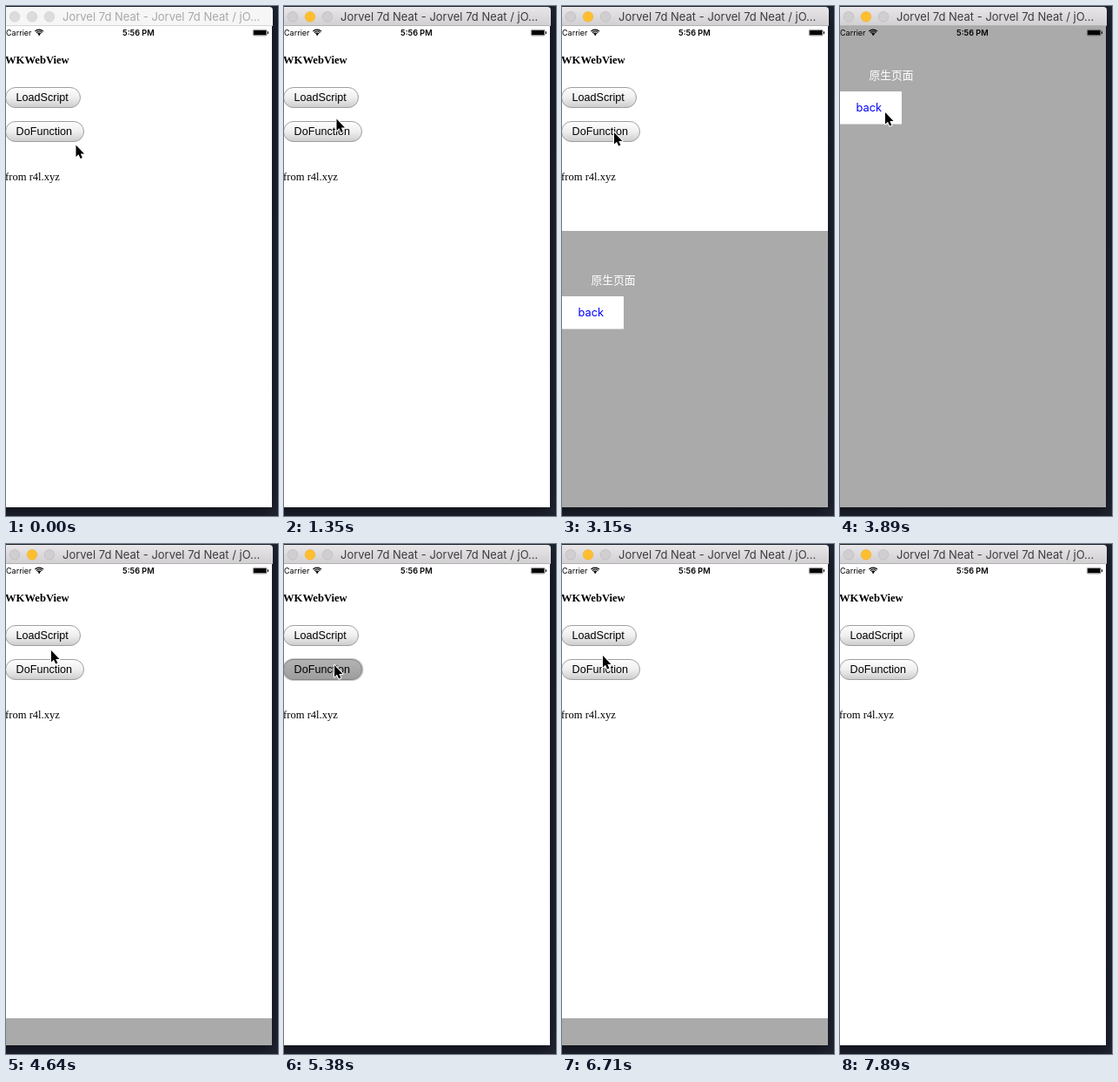
These frames come from a looping animation (313x585 px, 8.64 s). An HTML page with a canvas:

```html
<!DOCTYPE html>
<html lang="en">
<head>
<meta charset="utf-8">
<title>Simulator</title>
<style>
  html, body { margin: 0; width: 100%; height: 100%; overflow: hidden; background: #1c202b; }
  canvas { display: block; width: 313px; height: 585px; }
</style>
</head>
<body>
<canvas id="stage"></canvas>
<script>
const W = 313, H = 585, LOOP = 8640, BEAT = 146;
const VIEW = { top: 23, w: 306, h: 552 };
const SANS = 'Inter, Roboto, sans-serif';
const ARIAL = '"Liberation Sans", Arial, sans-serif';
const SERIF = '"Liberation Serif", "Times New Roman", serif';
const CJK = '"Noto Sans CJK SC", "Noto Sans CJK", sans-serif';

const canvas = document.getElementById('stage');
const ratio = window.devicePixelRatio || 1;
canvas.width = W * ratio;
canvas.height = H * ratio;
const c = canvas.getContext('2d');
c.scale(ratio, ratio);
c.lineJoin = 'round';

// Pointer moves: start time, beats, end x, end y
const START = [80.5, 159.5];
const MOVES = [
  [450, 4, 63, 140], [1200, 2, 60.5, 129.5], [1500, 1, 52, 109],
  [1950, 2, 57, 124], [2250, 3, 60, 145], [3450, 4, 52, 122],
  [4940, 4, 58, 139], [5670, 4, 47, 128], [6860, 6, 225, 560],
  [7740, 2, 226, 590]
];
// Sheet moves: start time, lead-in, opening
const SHEETS = [[3150, 105.6, true], [4490, 105.6, false], [5520, 110.7, true], [6560, 105.6, false]];

const between = (t, a, b) => t >= a && t < b;
const smooth = p => p * p * (3 - 2 * p);

function pointerAt(t) {
  let [x, y] = START;
  for (const [t0, beats, x1, y1] of MOVES) {
    if (t < t0) break;
    const p = smooth(Math.min(1, (Math.floor((t - t0) / BEAT) + 1) / beats));
    x += (x1 - x) * p;
    y += (y1 - y) * p;
  }
  return [x, y];
}

// Critically damped spring, sampled once per beat
function sheetOffset(t) {
  const move = SHEETS.filter(s => t >= s[0]).pop();
  if (!move) return VIEW.h;
  const [t0, lead, opening] = move;
  const u = (lead + Math.floor((t - t0) / BEAT) * BEAT) * 0.01826;
  const rest = (1 + u) * Math.exp(-u);
  return Math.round(VIEW.h * (opening ? rest : 1 - rest));
}

function rect(x, y, w, h, fill) {
  c.fillStyle = fill;
  c.fillRect(x, y, w, h);
}

function text(str, x, y, font, fill) {
  c.font = font;
  c.fillStyle = fill;
  c.fillText(str, x, y);
}

function fade(y0, y1, ...stops) {
  const g = c.createLinearGradient(0, y0, 0, y1);
  stops.forEach((s, i) => g.addColorStop(i / (stops.length - 1), s));
  return g;
}

function shape(path, fill, stroke, width = 1) {
  c.beginPath();
  path();
  if (fill) { c.fillStyle = fill; c.fill(); }
  if (stroke) { c.strokeStyle = stroke; c.lineWidth = width; c.stroke(); }
}

function desktop() {
  rect(0, 0, W, H, fade(0, H, '#1c2431', '#222634'));
  c.save();
  c.shadowColor = 'rgba(0, 0, 0, 0.6)';
  c.shadowBlur = 18 * ratio;
  c.shadowOffsetY = 6 * ratio;
  rect(-30, 4, VIEW.w + 30, VIEW.top + VIEW.h - 4, '#10141d');
  c.restore();
}

function titleBar(active) {
  const fill = active ? fade(1, 23, '#e8e6e8', '#d1cfd1') : '#f6f6f6';
  shape(() => c.roundRect(-8, 1, 315, 22, [0, 4, 0, 0]), fill);
  rect(0, 22, VIEW.w + 1, 1, active ? '#b3b1b3' : '#d5d5d5');
  const grey = active ? ['#d0ced0', '#b8b6b8'] : ['#dcdcdc', '#cacaca'];
  [10, 30, 50].forEach((x, i) => {
    const [f, s] = active && i === 1 ? ['#ffbe2f', '#f0b02c'] : grey;
    shape(() => c.arc(x, 12.3, 5.8, 0, 7), f, s, 0.6);
  });
  text('Jorvel 7d Neat - Jorvel 7d Neat / jO...', 65, 17, '13px ' + SANS, active ? '#3e3d3e' : '#a9a9a9');
}

function statusBar() {
  text('Carrier', 0, 34, '9px ' + SANS, '#000');
  text('5:56 PM', 134, 34, '600 9.2px ' + SANS, '#000');
  for (const r of [2.6, 4.6, 6.6]) {
    shape(() => c.arc(38.2, 33.7, r, -Math.PI * 0.76, -Math.PI * 0.24), null, '#000', 1.2);
  }
  shape(() => c.arc(38.2, 32.8, 1.1, 0, 7), '#000');
  shape(() => c.roundRect(284.3, 27.3, 15.8, 6.6, 1.2), null, '#444', 0.6);
  rect(285, 28, 14.5, 5.2, '#000');
  rect(301, 29.3, 1, 2.6, '#000');
}

function button(label, y, w, pressed) {
  const fill = pressed
    ? fade(y, y + 24, '#b4b4b4', '#9c9c9c')
    : fade(y, y + 24, '#ffffff', '#efefef', '#cbcbcb');
  if (pressed) shape(() => c.roundRect(-2, y - 1, w + 3.5, 26, 13), '#c9c9c9');
  shape(() => c.roundRect(-0.5, y + 0.5, w, 23, 11.5), fill, pressed ? '#858585' : '#9f9f9f');
  text(label, 11.6, y + 16, '12.6px ' + ARIAL, '#000');
}

function page(t) {
  rect(0, VIEW.top, VIEW.w, VIEW.h, '#fff');
  text('WKWebView', -1, 66, 'bold 12.6px ' + SERIF, '#000');
  button('LoadScript', 93, 86, between(t, 1650, 1800));
  button('DoFunction', 132, 90, between(t, 5380, 5520));
  text('from r4l.xyz', -1, 200, '12.6px ' + SERIF, '#000');
}

function sheet(offset) {
  c.save();
  c.beginPath();
  c.rect(0, VIEW.top, VIEW.w, VIEW.h);
  c.clip();
  c.translate(0, offset);
  rect(0, VIEW.top, VIEW.w, VIEW.h, '#aaaaaa');
  text('原生页面', 33.4, 84, '12.8px ' + CJK, '#fff');
  rect(0, 98, 71, 37.5, '#fff');
  text('back', 18.6, 121, '12.8px ' + SANS, '#0000ff');
  c.restore();
}

function pointer(x, y) {
  const pts = [[0, 0], [0, 13.4], [3, 10.7], [5.2, 15.6], [7.4, 14.6], [5.3, 9.9], [9.5, 9.9]];
  const outline = () => {
    pts.forEach(([px, py]) => c.lineTo(x + px, y + py));
    c.closePath();
  };
  shape(outline, null, '#fff', 2);
  shape(outline, '#000');
}

function draw(t) {
  desktop();
  page(t);
  sheet(sheetOffset(t));
  statusBar();
  titleBar(t >= 150);
  pointer(...pointerAt(t));
}

const begin = performance.now();
function tick() {
  draw((performance.now() - begin) % LOOP);
  requestAnimationFrame(tick);
}
tick();
</script>
</body>
</html>
```
